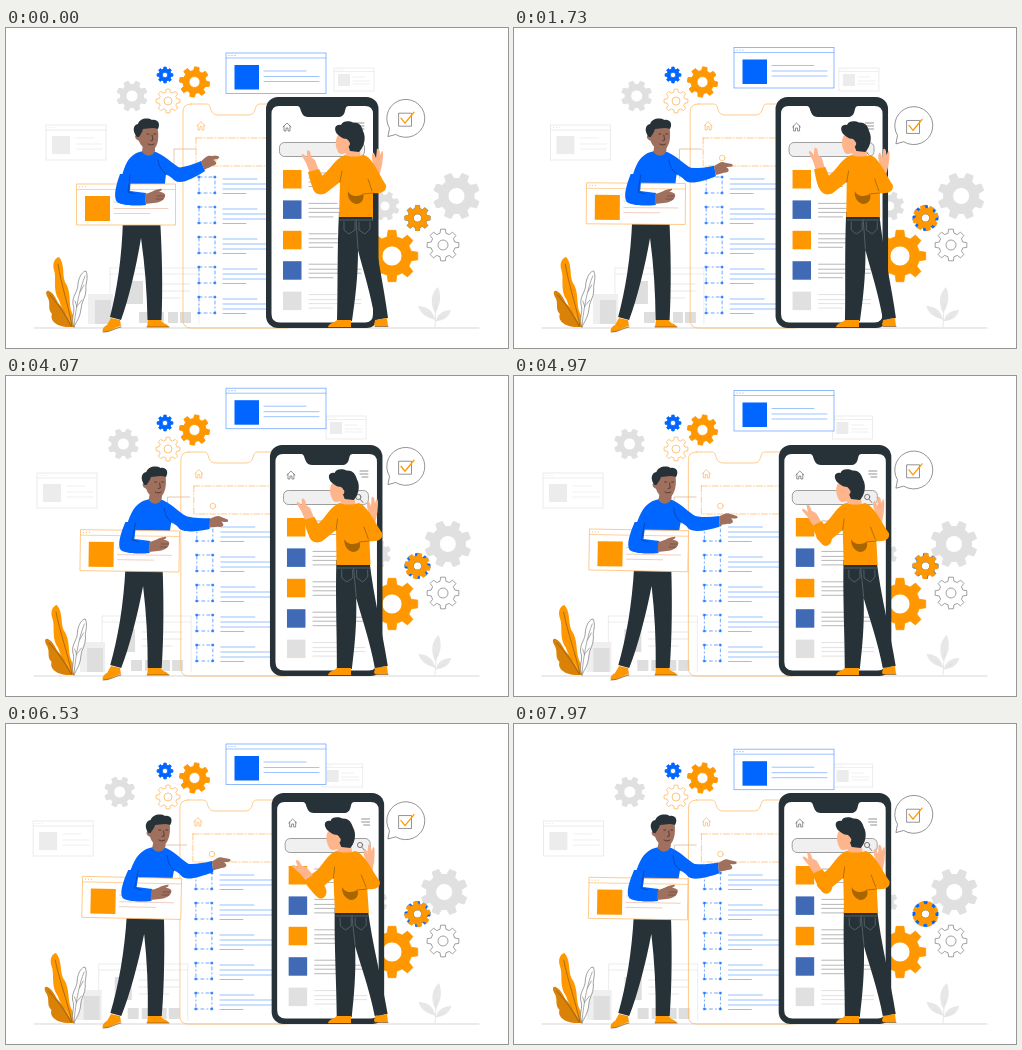
Write an HTML page that moves like this. It is 502 px wide and 320 px high and loops after 8 s.

```html
<!DOCTYPE html>
<html lang="en">
<head>
<meta charset="utf-8">
<title>App design</title>
<style>
html, body { margin: 0; width: 100%; height: 100%; overflow: hidden; background: #fff; }
svg { display: block; width: 100vw; height: 100vh; }
.o { fill: #ff9800; } .b { fill: #0066ff; } .d { fill: #263238; }
.w { fill: #fff; }
.brown { fill: #a0705f; } .peach { fill: #ffb58c; }
.ln { fill: none; stroke-linecap: round; stroke-linejoin: round; stroke-width: .7; }
</style>
</head>
<body>
<svg viewBox="0 0 502 320">
  <g id="greyLeft"></g>
  <g id="greyTop"></g>
  <g id="blocks">
    <path class="ln" stroke="#e4e4e4" d="M104 296V240H193V296M104 246H193"/>
    <path fill="#efefef" d="M82 266H107V296H82Z"/>
    <path fill="#dedede" d="M89 272h16v24h-16zM120 253h17v23h-17zM133 284h11v11h-11zM147 284h11v11h-11zM162 284h10v11h-10zM174 284h11v11h-11z"/>
    <path class="ln" stroke="#ddd" d="M144 256H184M144 263H184M144 270H174"/>
  </g>
  <g id="gears"></g>
  <g id="blueWindow"></g>

  <path class="ln" stroke="#c4c4c4" d="M28 300H473"/>

  <g id="leafOrange">
    <path class="o" d="M65 299C64 287 56 284 53 272C46 262 51 250 48 242C46 235 49 230 53 229C59 236 56 246 59 254C66 264 62 276 66 285C69 290 68 296 68 299Z"/>
    <path fill="#d98207" d="M65 299C54 300 43 294 46 286C41 281 45 276 42 270C39 265 40 262 43 263C49 266 50 272 53 276C59 282 62 290 67 299Z"/>
    <path class="ln" stroke="#8a5a10" d="M66 298C63 280 55 256 52 236M65 298C58 284 50 274 44 267"/>
  </g>
  <g id="leafLine">
    <path class="ln" style="fill:#fff" stroke="#777" d="M68 299C64 290 70 284 67 276C66 268 72 264 72 256C73 248 77 243 80 243C83 250 79 256 80 262C80 270 75 274 75 281C74 290 70 294 68 299Z"/>
    <path class="ln" stroke="#888" d="M68 298C70 278 74 260 79 248M71 279L69 273M71 278L76 272M74 264L78 257"/>
  </g>
  <g id="leafGrey" fill="#e7e7e7">
    <path d="M429 285C423 274 426 264 432 259C436 269 434 278 429 285ZM429 291C419 290 414 284 412 278C421 278 427 283 429 291ZM430 293C431 286 437 282 445 282C443 289 438 293 430 293Z"/>
    <path class="ln" stroke="#ddd" d="M429 299L430 276M429 292L420 284M430 293L438 288"/>
  </g>

  <g id="wirePhone" class="ln" stroke="#ffb75e">
    <path d="M185 76H200C204 76 204 79 205 82S208 87 212 87H242C246 87 248 85 249 82S250 76 254 76H282Q289 76 289 84V292Q289 300 281 300H185Q177 300 177 292V84Q177 76 185 76Z"/>
    <path d="M191 98L195 93.500L199 98M192 97V102H194V98.500H196V102H198V97"/>
    <path d="M190 110H275V138H190Z" stroke-dasharray="6 2 1 2"/>
    <circle cx="209" cy="130" r="2.800"/>
    <path id="connector" stroke="#dcb08c" d="M190 121H168V150"/>
    <g id="wireRows" stroke="#2f80ff"></g>
  </g>

  <g id="phone">
    <rect class="d" x="260" y="69" width="112.500" height="231" rx="12"/>
    <path class="w" d="M273 78H290C294 78 294 80 295 83S298 89 302 89H332C336 89 338 87 339 83S340 78 344 78H359Q367 78 367 86V286Q367 294.500 359 294.500H274Q265.500 294.500 265.500 286V86Q265.500 78 273 78Z"/>
    <path class="ln" stroke="#666" d="M277 99L281 95L285 99M278 98V103H280V100H282V103H284V98M350 95H358M350 98H358M352 101H358"/>
    <rect x="273.500" y="114.500" width="85" height="14" rx="5" fill="#f0f0f0" stroke="#888" stroke-width=".8"/>
    <path class="ln" stroke="#444" d="M351 121a2.600 2.600 0 1 1-5.200 0a2.600 2.600 0 1 1 5.200 0M350.500 123.500L353 126.500"/>
    <g id="phoneRows"></g>
  </g>

  <g id="bubble" class="ln" stroke="#666">
    <path fill="#fff" d="M382 110L383.500 102A19 19 0 1 1 390 108.500Z"/>
    <rect x="393" y="87" width="12.500" height="13"/>
    <path stroke="#ff9800" style="stroke-width:1.300" d="M395 92L399 97L408 86"/>
  </g>

  <g id="legsA">
    <path class="d" d="M117 190H154C156 222 157 260 155.500 292H141.500C141 264 139 238 135 210C130 240 123 270 115 292L104 289C111 262 116 230 117 190Z"/>
  </g>
  <path class="o" d="M105 290L114 292L115 298C109 299 105 304 98 304C95 303 97 299 101 297ZM142 292H155C156 296 161 295 163 299H141Z"/>
  <path class="ln" stroke="#7a4b08" d="M97 304C105 304 109 300 115 299M141 299H163"/>

  <g id="torsoA">
    <path class="b" d="M137 123C127 125 122 130 118 141L112 160L118 188H155C159 180 158 160 160 146L172 154L176 141C166 136 158 126 147 123Z"/>
    <path class="brown" d="M137 116H149V123C147 129 140 129 136 124Z"/>
    <path class="brown" d="M131 104C131 98 138 96 151 98C153 106 153 115 149 120C144 124 135 120 133 113C128 111 128 106 132 107Z"/>
    <path class="d" d="M131 109C126 103 127 97 132 96C133 91 141 89 146 92C151 91 155 95 152 101C146 99 142 101 137 101C136 105 134 107 133 109Z"/>
    <path class="ln" stroke="#3a2722" d="M141 106H143M148 106H150M146 107L147 112L145 112.500M142 116C144 117.500 147 117 148 116"/>
  </g>
  <g id="card"></g>
  <g id="armsA">
    <path class="b" d="M114 146L125 146L124 163L140 165L140 177C130 178 117 178 111 174C107 169 110 157 114 146Z"/>
    <path class="ln" stroke="#003ea3" d="M124 147L122 164L129 166M152 132C153 139 156 143 161 147"/>
    <path class="brown" d="M139 166C145 165 149 161 154 161C157 160 156 163 153 164C157 164 160 166 159 168C159 172 153 175 148 175L139 176Z"/>
    <path class="ln" stroke="#6b473c" d="M151 168L158 168M150 171L157 171"/>
    <g id="pointerA">
      <path class="b" d="M168 140C176 140 186 137 195 133L199 143C190 149 180 154 174 154C164 154 162 141 168 140Z"/>
      <path class="brown" d="M195 133.500C199 130 201 127 205 128L212 128C215 130 212 131 207 132C212 134 211 137 206 138C203 140 201 140 198.500 142Z"/>
    </g>
  </g>

  <g id="legsB">
    <path class="d" d="M333 184H366C369 220 378 258 382 290L369 292C365 266 357 242 352 222C352 250 349 272 346 293H331C332 258 331 224 333 184Z"/>
    <path class="ln" stroke="#60717a" d="M334 192H366M350 192L352 221M338 194V202L343 206L349 202V194M353 194V202L359 206L364 201V194"/>
  </g>
  <path class="o" d="M331 292H345V299H322C323 295 328 295 331 292ZM369 292L381 290L382 298H369C367 296 369 295 369 292Z"/>
  <path class="ln" stroke="#7a4b08" d="M322 299.500H345M369 298.500H382"/>

  <g id="torsoB">
    <path class="peach" d="M366 146L367 135C365 129 366 124 368 125L370 130L371 121C373 120 374 122 374 127L376 123C378 123 377 130 376 137L373 149Z"/>
    <path class="peach" d="M332 107C328 114 330 119 332 124C334 127 337 126 340 125L339 133L355 132L353 112Z"/>
    <path class="o" d="M339 127C344 129 351 129 358 127C367 130 374 148 380 157C381 163 376 166 367 165L367 189H333L334 154L320 165C314 168 309 166 307 161L312 150C323 146 327 131 339 127Z"/>
    <path class="d" d="M331 106C327 100 330 96 335 97C337 92 344 93 347 94.500C354 94 356 99 357 103C361 111 357 120 353 124L344 123C343 119 341 116 341 111C336 111 334 108 331 106Z"/>
    <path class="peach" d="M342 112C338 109 336 114 340 118C342 120 344 118 344 115Z"/>
    <path fill="#a86500" d="M342 163C344 169 352 169 357 166C359 171 355 176 350 176C345 175 341 170 342 163Z"/>
    <path class="ln" stroke="#94600d" d="M334 154L336 143M366 163L362 151M357 166L367 165"/>
    <g id="pointerB">
      <path class="peach" d="M304 145L300 135L296 128C295 125 298 125 301 130L301 123C303 121 305 124 305 129L309 132L313 143Z"/>
      <path class="o" d="M302 144L313 141L319 153C322 162 315 168 310 165C306 161 304 152 302 144Z"/>
    </g>
  </g>
</svg>

<script>
const LOOP = 8000;
const TIMES = [0, 1730, 2830, 4070, 5870, 7170, 7970];
const $ = id => document.getElementById(id);
const line = (x, y, w, color) => `<path class="ln" d="M${x} ${y}h${w}" stroke="${color}"/>`;
const square = (x, y, s, color) => `<rect x="${x}" y="${y}" width="${s}" height="${s}" fill="${color}"/>`;

// Smooth curve through the values at TIMES
function track(values) {
  const slope = values.map((_, i) => {
    const a = Math.max(i - 1, 0), b = Math.min(i + 1, values.length - 1);
    return (values[b] - values[a]) / (TIMES[b] - TIMES[a]);
  });
  return t => {
    let i = 0;
    while (i < TIMES.length - 2 && t > TIMES[i + 1]) i++;
    const h = TIMES[i + 1] - TIMES[i], u = Math.min((t - TIMES[i]) / h, 1);
    const u2 = u * u, u3 = u2 * u;
    return (2 * u3 - 3 * u2 + 1) * values[i] + (u3 - 2 * u2 + u) * h * slope[i]
      + (3 * u2 - 2 * u3) * values[i + 1] + (u3 - u2) * h * slope[i + 1];
  };
}

function browser({ x, y, w, h, head, box, color, fill, text, rows, textX }) {
  const dots = [3, 6, 9].map(d => `<circle cx="${x + d}" cy="${y + head / 2}" r=".6" fill="${color}"/>`).join('');
  return `<rect x="${x}" y="${y}" width="${w}" height="${h}" fill="#fff" stroke="${color}" stroke-width=".8"/>`
    + line(x, y + head, w, color) + dots + square(...box, fill)
    + rows.map(([dy, len]) => line(textX, y + dy, len, text)).join('');
}

function gearPath(r, hole, teeth = 8) {
  const step = 2 * Math.PI / teeth, points = [];
  for (let i = 0; i < teeth; i++) {
    for (const [f, k] of [[-.31, .76], [-.19, 1], [.19, 1], [.31, .76]]) {
      const a = (i + f) * step;
      points.push((r * k * Math.cos(a)).toFixed(2) + ' ' + (r * k * Math.sin(a)).toFixed(2));
    }
  }
  return `M${points.join('L')}ZM${hole} 0A${hole} ${hole} 0 1 0 ${-hole} 0A${hole} ${hole} 0 1 0 ${hole} 0Z`;
}

$('greyLeft').innerHTML = browser({ x: 40, y: 97, w: 60, h: 35, head: 5, box: [46, 108, 18], color: '#e6e6e6',
  fill: '#ececec', text: '#e8e8e8', textX: 70, rows: [[13, 18], [19, 26], [24, 26]] });
$('greyTop').innerHTML = browser({ x: 328, y: 40, w: 40, h: 23, head: 3.5, box: [332, 46, 12], color: '#e8e8e8',
  fill: '#ececec', text: '#e8e8e8', textX: 347, rows: [[9, 12], [13, 17], [16, 17]] });
$('blueWindow').innerHTML = browser({ x: 220, y: 0, w: 100, h: 40.5, head: 5, box: [228.5, 12, 24.5], color: '#74aaff',
  fill: '#0066ff', text: '#74aaff', textX: 258, rows: [[18, 42], [23.5, 55], [28.5, 55]] });
$('card').innerHTML = browser({ x: 70.5, y: 156, w: 99, h: 41, head: 5.5, box: [79, 168, 25], color: '#ffbd70',
  fill: '#ff9800', text: '#ecb8a6', textX: 108, rows: [[18, 40], [24.5, 54], [29.5, 36]] });

const WIRE_LEFT = 193, WIRE_SIZE = 16;
$('wireRows').innerHTML = [149, 179, 209, 239, 269].map(y => {
  const corners = [0, WIRE_SIZE].flatMap(dx => [0, WIRE_SIZE].map(dy =>
    square(WIRE_LEFT + dx - .8, y + dy - .8, 1.6, '#0066ff'))).join('');
  return `<rect x="${WIRE_LEFT}" y="${y}" width="${WIRE_SIZE}" height="${WIRE_SIZE}" stroke-dasharray="3 3 1 3"/>` + corners
    + [[2, 34], [7, 52], [12, 52], [16.5, 23]].map(([d, w]) => line(217, y + d, w, '#6aa4ff')).join('');
}).join('');
$('phoneRows').innerHTML = ['#ff9800', '#406ab5', '#ff9800', '#406ab5', '#e0e0e0'].map((color, i) => {
  const y = 142 + 30.4 * i, ink = i < 4 ? '#999' : '#d4d4d4';
  return square(277, y, 18.5, color)
    + [[3, 28], [8, 52], [12, 52], [16.5, 24]].map(([d, w]) => line(303, y + d, w, ink)).join('');
}).join('');

// x, y, radius, hole, fill, outline, drift, resting angle, spin
const GEARS = [
  [126, 68, 15.3, 6, '#e0e0e0', '', -12, 22.5, 0],
  [379, 178, 14.3, 5, '#e0e0e0', '', -12, 22.5, 0],
  [450.5, 168, 23.3, 8.5, '#e0e0e0', '', -12, 22.5, 0],
  [188.5, 54, 15.2, 5.5, '#ff9800', '', 0, 9, 0],
  [159, 47, 8, 2.7, '#0066ff', '', 0, 0, 0],
  [162, 73, 12, 4, '#fff', '#ffb75e', 0, 0, 0],
  [386, 228, 26, 10, '#ff9800', '', 0, 0, 0],
  [411.5, 190, 12.7, 4.2, '#0066ff', '', 0, 0, 0],
  [411.5, 190, 12.7, 4.2, '#ff9800', '', 0, 0, -1],
  [437, 217, 16, 5, '#fff', '#888', 0, 0, 0]
].map(([x, y, r, hole, fill, outline, drift, angle, spin]) => {
  const el = document.createElementNS('http://www.w3.org/2000/svg', 'path');
  const attributes = { d: gearPath(r, hole), fill, 'fill-rule': 'evenodd', stroke: outline || fill,
    'stroke-width': .8, 'stroke-linejoin': 'round' };
  for (const name in attributes) el.setAttribute(name, attributes[name]);
  $('gears').append(el);
  return { el, x, y, drift, angle, spin };
});

const drift = track([0, .28, .5, .72, 1, 1, .85]);
const windowY = track([25, 19.5, 15, 12.2, 17.8, 22.2, 25.2]);
const leanA = track([0, .34, .52, .68, 1, 1, .77]);
const leanB = track([0, .2, .34, .63, 1, 1, .75]);
const pointA = track([0, 11, 19, 21, 11, 10, 13]);
const pointB = track([0, 4, 4, 0, -16, -16, -8]);

const place = (id, transform) => $(id).setAttribute('transform', transform);
const shift = (id, x, y = 0) => place(id, `translate(${x} ${y})`);

// Shear so that height y1 moves by s1 and height y2 by s2
function lean(id, y1, s1, y2, s2) {
  const k = (s2 - s1) / (y2 - y1);
  place(id, `matrix(1 0 ${k} 1 ${s1 - k * y1} 0)`);
}

function draw(now) {
  const t = now % LOOP, p = drift(t), a = leanA(t), b = leanB(t), bend = pointB(t);
  shift('greyLeft', -12.5 * p);
  shift('greyTop', -11 * p);
  shift('blocks', -11 * p);
  shift('blueWindow', 0, windowY(t));
  shift('phone', 5.5 * p);
  shift('wirePhone', -3 * p);
  shift('connector', -6 * p);
  shift('bubble', 0, 2 - 3.8 * Math.cos(2 * Math.PI * t / 4000));
  lean('leafOrange', 299, 0, 229, -3 * p);
  lean('leafLine', 299, 0, 243, -p);
  lean('leafGrey', 299, 0, 260, p);

  lean('legsA', 300, 0, 197, 3.5 * a);
  for (const id of ['torsoA', 'armsA']) lean(id, 197, 3.5 * a, 104, 11.5 * a);
  place('card', `translate(${5.5 * a} ${-2.5 * a}) rotate(${1.2 * a} 120 176)`);
  place('pointerA', `rotate(${pointA(t)} 172 147)`);

  lean('legsB', 300, 0, 188, -4 * b);
  lean('torsoB', 188, -4 * b, 107, -9.5 * b);
  place('pointerB', `translate(${-.4 * bend} ${-.5 * bend}) rotate(${bend} 313 160)`);

  for (const g of GEARS) {
    const turn = g.angle + g.spin * 45 * t / 5400;
    g.el.setAttribute('transform', `translate(${g.x + g.drift * p} ${g.y}) rotate(${turn})`);
  }
}

const start = performance.now();
function tick() {
  draw(performance.now() - start);
  requestAnimationFrame(tick);
}
draw(0);
requestAnimationFrame(tick);
</script>
</body>
</html>
```
